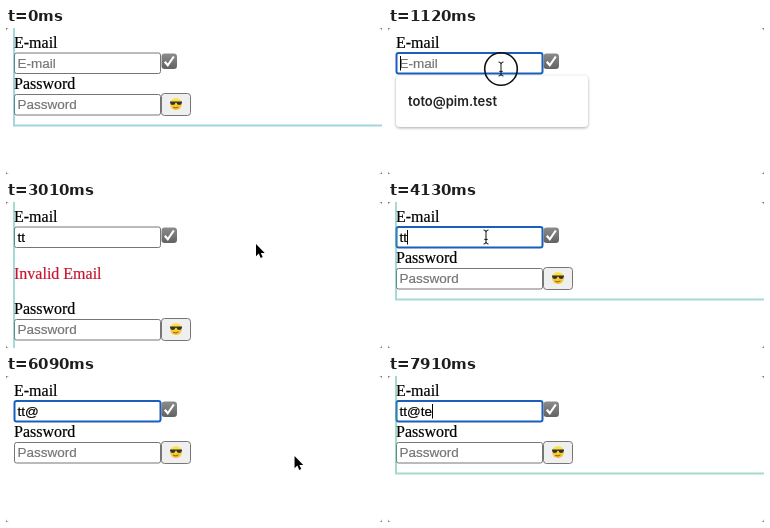
Animation, 376 px wide and 146 px high, one loop 8000 ms. Source, as an HTML page:

```html
<!DOCTYPE html>
<html lang="en">
<head>
<meta charset="utf-8">
<title>Login form</title>
<style>
html, body { margin: 0; width: 100%; height: 100%; overflow: hidden; background: #777; }
svg { display: block; }
.label, .field { fill: currentColor; stroke: currentColor; stroke-width: .2; white-space: pre; }
.label { font: 16px "Liberation Serif", Times, serif; }
.field { font: 13.5px "Liberation Sans", Arial, sans-serif; }
.hint { color: #757575; }
.box { fill: #fff; stroke: #767676; }
.item { font: 600 13px Inter, sans-serif; fill: #222; }
#error { color: #c8152f; }
#menu rect { filter: drop-shadow(0 1px 1.5px #0005); }
#flash { fill: none; stroke-width: 2; opacity: .45; }
</style>
</head>
<body>
<svg width="376" height="146" viewBox="0 0 376 146">
  <defs>
    <linearGradient id="grey" x2="0" y2="1">
      <stop stop-color="#8c8c8c"/><stop offset="1" stop-color="#626262"/>
    </linearGradient>
    <linearGradient id="gold" x2="0" y2="1">
      <stop stop-color="#ffe648"/><stop offset="1" stop-color="#f3bd2b"/>
    </linearGradient>
  </defs>
  <rect width="376" height="146" rx="3.5" fill="#fff"/>

  <text class="label" x="8" y="20">E-mail</text>
  <rect class="box" id="email" x="8.5" y="25" width="146" height="20.5" rx="2"/>
  <text class="field hint" id="hint" x="11.5" y="39.5">E-mail</text>
  <text class="field" id="typed" x="11.5" y="39.5"></text>
  <rect id="caret" y="28" width="1" height="14.5"/>
  <rect x="155.5" y="25.5" width="15.5" height="15.5" rx="3.2" fill="url(#grey)"/>
  <path d="M158.8 33.7l3 3.6 6-8.8" fill="none" stroke="#fff" stroke-width="2.2"/>

  <text class="label" id="error" x="8" y="77">Invalid Email</text>

  <g id="password">
    <text class="label" x="8" y="60.5">Password</text>
    <rect class="box" x="8.5" y="66.5" width="146" height="20.5" rx="2"/>
    <text class="field hint" x="11.5" y="81">Password</text>
    <rect x="155.5" y="65.5" width="29" height="22" rx="3" fill="#efefef" stroke="#767676"/>
    <circle cx="170" cy="76" r="6" fill="url(#gold)"/>
    <path d="M164 73.6h12v.9q-.5 2.6-2.9 2.6-2 0-2.6-2.3h-1q-.6 2.3-2.6 2.3-2.4 0-2.9-2.6z" fill="#333"/>
    <path d="M167.2 79.2q2.8 1.7 5.2-.3" fill="none" stroke="#8a5010" stroke-width=".9"/>
  </g>

  <path id="flash"/>
  <g id="menu">
    <rect x="8" y="47.5" width="192" height="51.5" rx="4" fill="#fff"/>
    <text class="item" x="20" y="78">toto@pim.test</text>
  </g>

  <g id="cursor">
    <circle id="ring" r="16.3" fill="none" stroke="#111" stroke-width="1.6"/>
    <path id="arrow" d="M0 0V12.2l2.8-2.6 1.9 4.4 2-.9-1.9-4.2h3.9z" stroke="#fff" paint-order="stroke"/>
    <path id="beam" d="M-2.5-7Q0-7 0-5V5Q0 7-2.5 7M2.5-7Q0-7 0-5M0 5Q0 7 2.5 7M-1.7 2.4h3.4" fill="none" stroke="#111"/>
  </g>
</svg>
<script>
const LOOP = 8000, STEP = 70, RING = 140, FLASH = 420, BLINK = 560, NUDGE = 140;
const TEXT = "tt@te", keys = [2100, 2380, 5530, 7770, 7910];

// Each move ends with its click, or after NUDGE if there is none.
const moves = [
  { start: 140, x: 113, y: 41, click: 700 },
  { start: 910, x: 113, y: 41, click: 1050 },
  { start: 1820, x: 112, y: 51 },
  { start: 2520, x: 250, y: 42, click: 2870 },
  { start: 3570, x: 98, y: 35, click: 3990 },
  { start: 4830, x: 174, y: 86 },
  { start: 5880, x: 289, y: 80, click: 6160 },
  { start: 6790, x: 91, y: 32, click: 7000 },
  { start: 7350, x: 172, y: 83 }
];

const $ = id => document.getElementById(id);
const show = (id, on) => $(id).style.display = on ? "" : "none";
const set = (id, name, value) => $(id).setAttribute(name, value);
const overField = (x, y) => x > 8 && x < 155 && y > 25 && y < 47;

function stateAt(t) {
  const s = { x: 300, y: 150, focus: false, error: false, menu: false,
    moved: -1, clicked: -LOOP, flashEnd: 0 };
  for (const { start, x, y, click } of moves) {
    if (start > t) break;
    const p = Math.min(1, (t - start) / ((click ?? start + NUDGE) - start));
    const ease = 1 - (1 - p) ** 4;
    s.x += (x - s.x) * ease;
    s.y += (y - s.y) * ease;
    s.moved = start;
    if (!(click <= t)) continue;
    const inside = overField(x, y);
    s.menu = inside && s.focus;
    if (inside !== s.focus) s.flashEnd = click + FLASH;
    s.focus = inside;
    s.error = !inside;
    s.clicked = click;
  }
  const pressed = keys.filter(k => k <= t);
  s.text = TEXT.slice(0, pressed.length);
  s.keyed = pressed.at(-1) ?? -1;
  s.menu &&= s.text.length < 2;
  s.flash = t < Math.max(s.flashEnd, s.keyed + FLASH / 2);
  return s;
}

function draw(now) {
  const t = Math.floor(now % LOOP / STEP) * STEP;
  const s = stateAt(t);
  const beam = overField(s.x, s.y);
  const idle = t - Math.max(s.clicked, s.keyed);

  $("typed").textContent = s.text;
  show("hint", !s.text);
  set("email", "style", s.focus ? "stroke: #1b5fbd; stroke-width: 2" : "");
  set("caret", "x", Math.round(11.6 + (s.text ? $("typed").getComputedTextLength() : 0)));
  show("caret", s.focus && idle % (2 * BLINK) < BLINK);
  show("error", s.error);
  set("password", "transform", `translate(0 ${s.error ? 51 : 0})`);
  show("menu", s.menu);

  show("flash", s.flash);
  set("flash", "d", `M8 0V${s.error ? 148 : 97.5}H376`);
  set("flash", "stroke", `hsl(${186 - 5 * s.text.length} 52% 45%)`);

  show("cursor", s.moved > s.keyed);
  show("beam", beam);
  show("arrow", !beam);
  show("ring", t - s.clicked < RING);
  set("ring", "transform", beam ? "" : "translate(4 7)");
  set("cursor", "transform", `translate(${s.x} ${s.y})`);
}

function frame() {
  draw(performance.now() - begin);
  requestAnimationFrame(frame);
}
const begin = performance.now();
frame();
</script>
</body>
</html>
```
